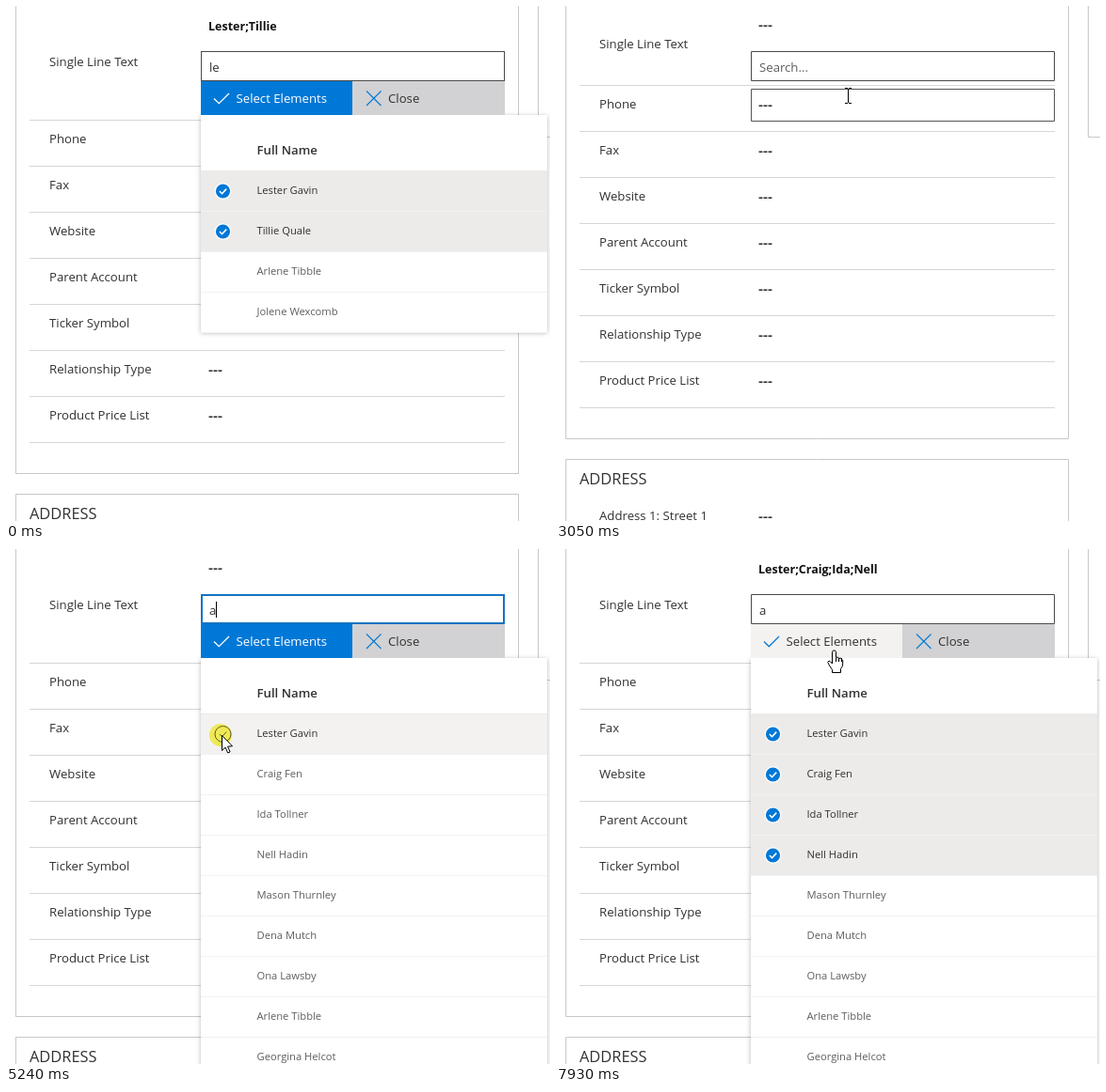
An HTML page with a canvas that plays this animation: 578 px wide and 548 px high, repeating every 8 s.

```html
<!DOCTYPE html>
<html lang="en">
<head>
<meta charset="utf-8">
<title>Lookup field</title>
<style>
html, body { margin: 0; width: 100%; height: 100%; overflow: hidden; background: #fff; }
canvas { display: block; width: 578px; height: 548px; }
</style>
</head>
<body>
<canvas id="stage"></canvas>
<script>
const W = 578, H = 548, LOOP = 8000;
const canvas = document.getElementById('stage');
const ctx = canvas.getContext('2d');
const ratio = window.devicePixelRatio || 1;
canvas.width = W * ratio;
canvas.height = H * ratio;

const FAMILY = '"Open Sans", "Noto Sans", sans-serif';
const BLUE = '#0078d7', INK = '#323130', GREY = '#605e5c';
const LABELS = ['Phone', 'Fax', 'Website', 'Parent Account', 'Ticker Symbol',
  'Relationship Type', 'Product Price List'];
const LISTS = {
  le: ['Lester Gavin', 'Tillie Quale', 'Arlene Tibble', 'Jolene Wexcomb'],
  a: ['Lester Gavin', 'Craig Fen', 'Ida Tollner', 'Nell Hadin', 'Mason Thurnley',
    'Dena Mutch', 'Ona Lawsby', 'Arlene Tibble', 'Georgina Helcot']
};

const START = { open: true, text: 'le', value: 'Lester;Tillie', picked: 2,
  focus: false, hover: '', click: false };

// State changes: [time, patch]
const EVENTS = [
  [337, { hover: 'field6' }], [413, { hover: 'field5' }], [490, { hover: '' }],
  [950, { hover: 'row1', click: true }], [1030, { picked: 1, click: false }],
  [1182, { hover: 'row0' }], [1340, { click: true }], [1415, { picked: 0, click: false }],
  [1567, { hover: 'head' }], [1900, { hover: 'close' }], [1977, { hover: 'select' }],
  [2270, { click: true }], [2350, { click: false }],
  [2520, { open: false, value: '', text: '' }], [2600, { hover: 'field0' }],
  [3140, { hover: '' }], [3217, { hover: 'input' }], [3380, { click: true, focus: true }],
  [3450, { click: false }], [3830, { text: 'a' }], [4310, { open: true }],
  [4470, { hover: 'select' }], [4690, { hover: 'head' }], [5000, { hover: 'row0' }],
  [5160, { click: true }], [5310, { click: false, picked: 1, focus: false }],
  [5466, { hover: 'row1' }], [5850, { click: true }], [5930, { click: false, picked: 2 }],
  [6310, { hover: 'row2', picked: 3 }], [6467, { hover: 'row3' }],
  [6620, { click: true }], [6695, { click: false, picked: 4 }],
  [6770, { hover: 'row2' }], [6847, { hover: 'row1' }], [6925, { hover: 'row0' }],
  [7002, { hover: 'head' }], [7160, { hover: 'select' }],
  [7400, { click: true }], [7470, { click: false }],
  [7630, { value: 'Lester;Craig;Ida;Nell' }]
];

// Pointer moves: [first step, last step, steps, x, y]
const MOVES = [
  [260, 720, 7, 231, 233], [1105, 1260, 3, 231, 197], [1490, 1800, 5, 415, 117],
  [1900, 2130, 4, 300, 99], [3050, 3050, 1, 310, 95], [3140, 3300, 3, 272, 65],
  [4470, 5080, 9, 229, 198], [5390, 5620, 4, 231, 240], [6007, 6160, 3, 231, 276],
  [6310, 6310, 1, 232, 286], [6390, 6545, 3, 231, 326], [6770, 7080, 5, 285, 125],
  [7160, 7230, 2, 293, 104], [7930, 7930, 1, 294, 107]
];

const ARROW = [[0, 0], [0, 16], [3.6, 12.6], [6.2, 18.4], [8.6, 17.4], [6.1, 11.7], [11, 11.3]];
const HAND = [[-1, 2], [0, .5], [2, .5], [3, 2], [3, 8], [5, 7.5], [6, 9], [8, 8.5], [9, 10],
  [10.3, 11], [10, 17], [8, 20], [8, 24], [-1, 24], [-1, 21], [-4, 16.5], [-5.7, 13],
  [-4.5, 11.5], [-3, 12.3], [-1, 14.5]];

function stateAt(t) {
  const s = { ...START };
  for (const [at, patch] of EVENTS) if (t >= at) Object.assign(s, patch);
  return s;
}

function pointerAt(t) {
  let x = 300, y = 513;
  for (const [from, to, steps, tx, ty] of MOVES) {
    if (t < from) break;
    const done = to > from ? Math.floor((t - from) / (to - from) * (steps - 1) + 1e-6) + 1 : steps;
    const k = Math.min(1, done / steps);
    x += (tx - x) * k;
    y += (ty - y) * k;
  }
  return { x: Math.round(x), y: Math.round(y) };
}

function text(str, x, y, size = 13.2, color = INK, weight = 400) {
  ctx.font = `${weight} ${size}px ${FAMILY}`;
  ctx.fillStyle = color;
  ctx.fillText(str, x, y);
}

function rect(x, y, w, h, color) {
  ctx.fillStyle = color;
  ctx.fillRect(x, y, w, h);
}

function frame(x, y, w, h, color, line = 1) {
  ctx.strokeStyle = color;
  ctx.lineWidth = line;
  ctx.strokeRect(x + line / 2, y + line / 2, w - line, h - line);
}

function trace(points, dx = 0, dy = 0) {
  ctx.beginPath();
  for (const [x, y] of points) ctx.lineTo(x + dx, y + dy);
}

function stroke(points, color, line, dx, dy) {
  trace(points, dx, dy);
  ctx.strokeStyle = color;
  ctx.lineWidth = line;
  ctx.stroke();
}

function disc(x, y, r, color) {
  ctx.beginPath();
  ctx.arc(x, y, r, 0, Math.PI * 2);
  ctx.fillStyle = color;
  ctx.fill();
}

function ring(x, y, r, color) {
  ctx.beginPath();
  ctx.arc(x, y, r, 0, Math.PI * 2);
  ctx.strokeStyle = color;
  ctx.lineWidth = 1;
  ctx.stroke();
}

const dashes = y => text('---', 215, y, 15.5, INK, 600);
const tick = (x, y, color, line) => stroke([[-3.6, 0], [-1, 2.7], [3.7, -2.4]], color, line, x, y);

function drawForm(s) {
  const shift = s.open ? 0 : -37;
  const edge = '#c8c8c8';
  frame(10, -5, 535, 503 + shift, edge);
  frame(10, 519 + shift, 535, 200, edge);
  frame(565, -5, 60, 145, edge);

  text('Single Line Text', 46, s.open ? 64 : 45);
  if (s.value) text(s.value, 215, 26, 12.5, '#111', 700);
  else dashes(26);

  LABELS.forEach((label, i) => {
    const y = 121 + shift + i * 49;
    rect(25, y, 505, 1, '#d6d6d6');
    text(label, 46, y + 25);
    dashes(y + 27);
    if (s.hover === 'field' + i) frame(207, y + 4, 323, 35, '#555');
  });
  rect(25, 464 + shift, 505, 1, '#d6d6d6');

  text('ADDRESS', 25, 546 + shift, 16.4);
  if (!s.open) {
    text('Address 1: Street 1', 46, 547);
    dashes(549);
  }
}

function drawInput(s) {
  rect(207, 48, 323, 32, '#fff');
  if (s.focus) frame(207, 48, 323, 32, '#1473c2', 2);
  else frame(207, 48, 323, 32, '#4a4a4a');
  text(s.text || 'Search...', 216, 70, 13.2, s.text ? INK : GREY);
  if (s.focus) {
    const w = s.text ? ctx.measureText(s.text).width : 0;
    rect(Math.round(216 + w), 56, 1, 17, '#000');
  }
}

function drawButtons(s) {
  const onSelect = s.hover === 'select';
  rect(207, 80, 161, 36, onSelect ? '#f3f2f1' : BLUE);
  rect(368, 80, 162, 36, s.hover === 'close' ? '#f3f2f1' : '#d2d1d3');
  stroke([[221, 98.5], [226.3, 103.7], [237, 93]], onSelect ? BLUE : '#fff', 1.3);
  text('Select Elements', 244.5, 103, 13.2, onSelect ? INK : '#fff');
  stroke([[383, 90.5], [398.5, 106]], BLUE, 1.1);
  stroke([[398.5, 90.5], [383, 106]], BLUE, 1.1);
  text('Close', 406, 103);
}

function drawRow(name, i, s) {
  const y = 176 + i * 43;
  const picked = i < s.picked, over = s.hover === 'row' + i;
  const fill = picked ? (over ? '#dfdddb' : '#edebe9') : (over ? '#f3f2f1' : '#fff');
  rect(207, y, 368, 42, fill);
  rect(207, y + 42, 368, 1, '#f3f2f1');
  if (picked) {
    disc(230.5, y + 21, 8.7, '#fff');
    disc(230.5, y + 21, 7.6, BLUE);
    tick(230.5, y + 21, '#fff', 1.6);
  } else if (over) {
    ring(230.5, y + 21, 8.5, GREY);
    tick(230.5, y + 21, GREY, 1);
  }
  text(name, 266.5, y + 24, 11.2, picked || over ? INK : GREY);
}

function drawPopup(s) {
  const names = LISTS[s.text] || LISTS.le;
  ctx.save();
  ctx.shadowColor = 'rgba(0,0,0,.28)';
  ctx.shadowBlur = 5 * ratio;
  ctx.shadowOffsetY = ratio;
  rect(207, 116, 368, 60 + names.length * 43 - 1 + 1 - 1, '#fff');
  ctx.restore();
  drawButtons(s);
  rect(207, 175, 368, 1, '#edebe9');
  if (s.hover === 'head') ring(230.5, 153, 8.5, INK);
  text('Full Name', 266.5, 158, 13.2, INK, 600);
  names.forEach((name, i) => drawRow(name, i, s));
}

function drawPointer(s, { x, y }) {
  if (s.click) {
    ctx.globalCompositeOperation = 'multiply';
    disc(x - 1, y, 12, '#fbf65c');
    ctx.globalCompositeOperation = 'source-over';
  }
  if (/field|input/.test(s.hover)) {
    rect(x, y - 7, 1, 15, '#000');
    for (const dy of [-8, 8]) {
      rect(x - 3, y + dy, 3, 1, '#000');
      rect(x + 1, y + dy, 3, 1, '#000');
    }
    return;
  }
  const hand = /select|close/.test(s.hover);
  trace(hand ? HAND : ARROW, x + .5, y + .5);
  ctx.closePath();
  ctx.fillStyle = '#fff';
  ctx.fill();
  ctx.strokeStyle = '#000';
  ctx.lineWidth = 1;
  ctx.lineJoin = hand ? 'round' : 'miter';
  ctx.stroke();
  if (hand) {
    for (const dx of [3, 6, 9]) stroke([[dx, 8.5], [dx, 12.5]], '#000', 1, x + .5, y + .5);
  }
}

function draw(t) {
  const s = stateAt(t);
  ctx.setTransform(ratio, 0, 0, ratio, 0, 0);
  rect(0, 0, W, H, '#fff');
  drawForm(s);
  if (s.open) drawPopup(s);
  drawInput(s);
  if (t >= 260) drawPointer(s, pointerAt(t));
}

const begin = performance.now();
function tickFrame() {
  draw((performance.now() - begin) % LOOP);
  requestAnimationFrame(tickFrame);
}
tickFrame();
</script>
</body>
</html>
```
